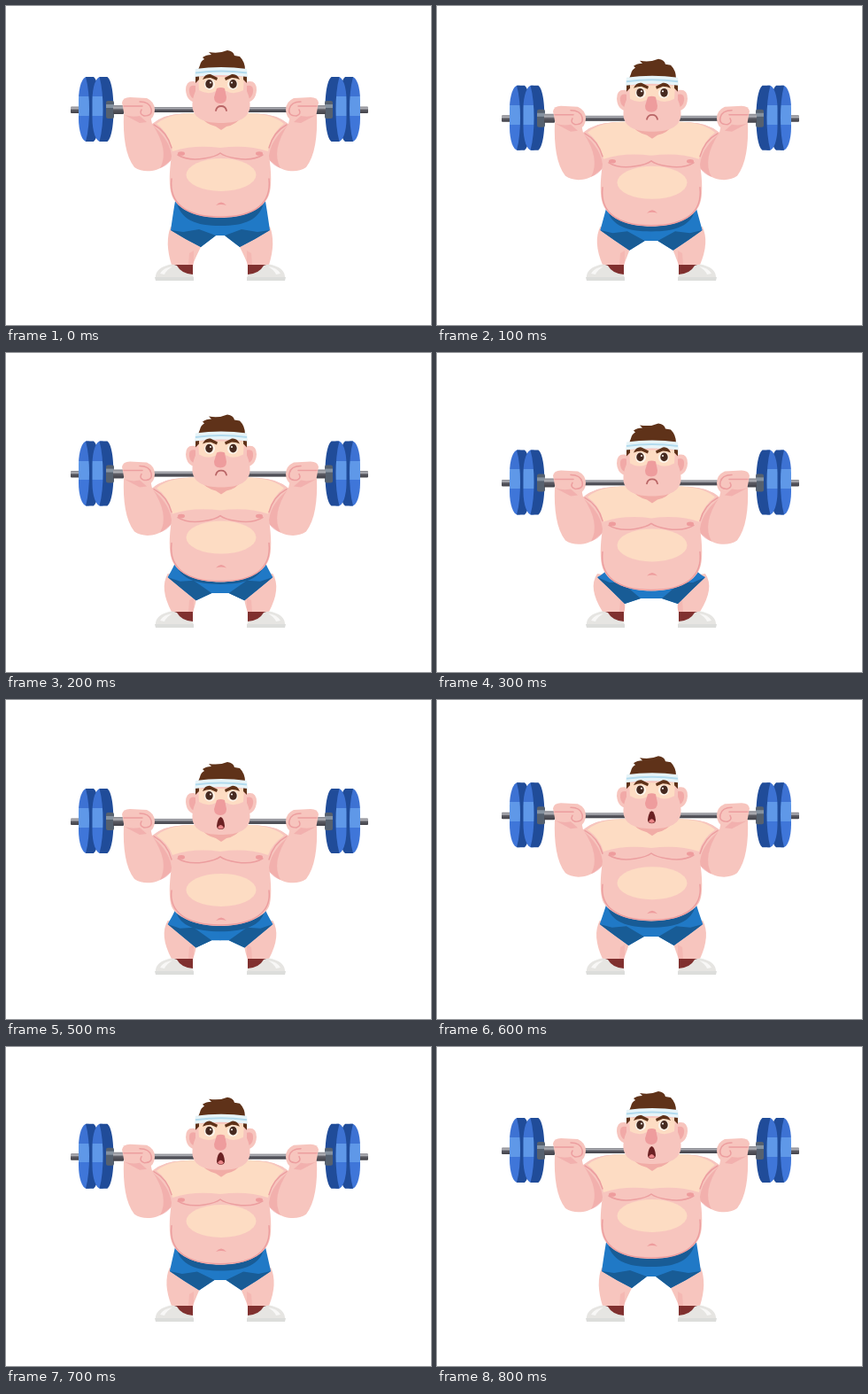
An HTML page for the animation above (1.1 s loop, 480 px wide and 360 px high).

```html
<!DOCTYPE html>
<html lang="en">
<head>
<meta charset="utf-8">
<title>Squats</title>
<style>
  html, body { margin: 0; width: 100%; height: 100%; overflow: hidden; background: #fff; }
  svg { display: block; width: 480px; height: 360px; }
  .skin { fill: #f7c5be; }
  .cream { fill: #fddcc3; }
  .pink { fill: #ee9c9d; }
  .blue { fill: #2079c6; }
  .navy { fill: #185c96; }
  .hair { fill: #5f3219; }
  .crease { fill: none; stroke: #ec9e9f; stroke-width: 1.5; stroke-linecap: round; }
</style>
</head>
<body>
<svg viewBox="0 0 480 360">
  <defs>
    <linearGradient id="steel" x2="0" y2="1">
      <stop offset="0" stop-color="#85858c"/>
      <stop offset=".3" stop-color="#b0b1b7"/>
      <stop offset=".5" stop-color="#5c5c64"/>
      <stop offset="1" stop-color="#414148"/>
    </linearGradient>
    <linearGradient id="rim" x2="0" y2="1">
      <stop offset=".3" stop-color="#3d72d3"/>
      <stop offset=".3" stop-color="#5f98e8"/>
      <stop offset=".6" stop-color="#5f98e8"/>
      <stop offset=".6" stop-color="#3f76d9"/>
    </linearGradient>
    <g id="plate">
      <rect width="20" height="73" rx="9" ry="26" fill="url(#rim)"/>
      <path fill="#204c99" d="M8 0H17C22 4 24 20 24 36.500S22 69 17 73H8C11 62 12 49 12 36.500S11 11 8 0Z"/>
    </g>
  </defs>

  <!-- Left halves are reused mirrored about x = 242 -->
  <g id="leg">
    <path id="thigh" class="skin"/>
    <path class="pink" opacity=".3" d="M207 279L212 276V292H206Z"/>
    <path fill="#80302f" d="M190 292H211V304H190Z"/>
    <path fill="#e6e5e2" d="M169 308C168 300 174 295 181 293Q187 290 193 293Q198 302 211 303L212 308Z"/>
    <path fill="#fff" opacity=".7" d="M174 302Q178 295 188 294Q181 298 179 303Z"/>
    <path fill="#dcdddb" d="M168 306H212V310H169Z"/>
    <path id="shorts" class="blue"/>
    <path id="hem" class="navy"/>
  </g>
  <use href="#leg" transform="matrix(-1 0 0 1 484 0)"/>

  <g id="upper">
    <path id="shade" class="navy"/>
    <rect x="74" y="114" width="334" height="6" fill="url(#steel)"/>
    <g id="weight">
      <rect x="73" y="113.500" width="11" height="7.500" rx="1" fill="url(#steel)"/>
      <use href="#plate" x="82" y="80"/>
      <use href="#plate" x="97.500" y="80"/>
      <rect x="113" y="107" width="9" height="20" rx="2" fill="#56616f"/>
      <rect x="113" y="111" width="9" height="4" fill="#8592a0"/>
      <rect x="121" y="112" width="12" height="10" rx="1" fill="url(#steel)"/>
    </g>
    <use href="#weight" transform="matrix(-1 0 0 1 482 0)"/>

    <g id="arm">
      <path class="skin" d="M133 122C132 147 135 169 145 182C155 189 170 187 179 180L194 168L206 122Q181 120 165 133L163 124Z"/>
      <path class="pink" opacity=".5" d="M165 133Q181 143 187 160V173Q183 180 174 183Q185 163 165 133Z"/>
      <path class="skin" d="M131 109Q132 103 140 103L159 104Q168 108 168 117T160 130L151 132L134 125Z"/>
      <path class="pink" opacity=".5" d="M134 123Q143 126 151 124L159 131L151 132Z"/>
      <path class="crease" d="M133 113H154M151 108Q162 108 164 116T156 124Q150 122 153 117"/>
    </g>
    <use href="#arm" transform="matrix(-1 0 0 1 484 0)"/>

    <path id="torso" class="skin"/>
    <path id="fold" class="crease"/>
    <path id="chest" class="cream"/>
    <path class="crease" d="M167 134Q182 142 187 160M317 134Q302 142 297 160"/>
    <g id="pecs">
      <path class="crease" d="M194 168Q205 175 224 172Q237 170 242 166Q247 170 260 172Q279 175 290 168"/>
      <ellipse class="pink" cx="198" cy="166.500" rx="4" ry="2.300"/>
      <ellipse class="pink" cx="286" cy="166.500" rx="4" ry="2.300"/>
    </g>
    <g id="belly">
      <ellipse class="cream" cx="243" cy="190.500" rx="39.500" ry="18.500"/>
      <path class="pink" d="M237 225Q243 218 249 225Q243 223 237 225Z"/>
    </g>
    <path class="pink" opacity=".75" d="M219 124H267Q260 134 249 136L243 140L237 136Q225 133 219 124Z"/>

    <g id="ear">
      <path class="skin" d="M216 86Q203 82 203 95Q204 108 215 109Z"/>
      <path class="pink" opacity=".7" d="M214 90Q206 88 207 97Q208 104 214 105Z"/>
    </g>
    <use href="#ear" transform="matrix(-1 0 0 1 486 0)"/>
    <path class="skin" d="M215 72H271L272 96Q276 105 275.500 114C274 128 260 132 243 132S212 128 210.500 114Q210 105 214 96Z"/>
    <path class="cream" d="M217 80H269L268 95Q257 101 249 96H237Q228 101 218 95Z"/>
    <path class="hair" d="M217 72L219 67Q220 62 224 60L222 58Q226 55 232 55L229 52Q241 54 250 50Q257 51 258 56L264 57Q270 63 270 72Z"/>
    <path class="hair" d="M214 79H218V83L214 87ZM272 79H268V83L272 87Z"/>
    <path fill="#e7f4f8" d="M214 71Q243 67 272 71L273 80Q243 76 213 80Z"/>
    <path fill="none" stroke="#b3dbee" stroke-width="2" d="M214 75.500Q243 71.500 272 75.500"/>
    <g id="eye">
      <circle cx="230" cy="88.500" r="6" fill="#fdf4ea"/>
      <ellipse cx="229.500" cy="88" rx="4.200" ry="4.900" fill="#45291f"/>
      <circle cx="231" cy="86.500" r="1" fill="#fff"/>
      <path class="hair" d="M222 83Q225 76 231 77L239 81L238 84L231 81Q226 81 222 83Z"/>
    </g>
    <use href="#eye" transform="matrix(-1 0 0 1 486 0)"/>
    <path class="pink" d="M238 93Q242.500 91 247 93L249 103Q249 110 242 110T235 103Z"/>
    <path id="frown" fill="none" stroke="#b96566" stroke-width="1.800" stroke-linecap="round" d="M237 118Q238 113 243 113T249 118"/>
    <g id="gasp">
      <path fill="#6b2123" d="M242.500 112Q246 113 247 122Q247 126 242.500 126T238 122Q239 113 242.500 112Z"/>
      <path fill="#e98487" d="M239 124Q242.500 118 246 124Q242.500 127 239 124Z"/>
    </g>
  </g>
</svg>
<script>
const LOOP = 1100, STEP = 100, DEPTH = 29.5;
const $ = id => document.getElementById(id);
const setPath = (id, d) => $(id).setAttribute('d', d);
const shiftY = (id, y) => $(id).setAttribute('transform', `translate(0 ${y})`);

function draw(now) {
  const step = Math.floor(now % LOOP / STEP);
  // Quick descent, slower rise, then a rest at the top
  const drop = Math.max(0, Math.min(9.8 * step, 6.65 * (8 - step)));
  const k = drop / DEPTH;
  // Flesh lags behind the bar while the body pushes up
  const wobble = step > 3 && step < 7 ? Math.sin(Math.PI * (step - 3) / 4) : 0;
  const pecShift = -3 * k - 7 * wobble;
  const base = 239 - 4 * wobble;

  shiftY('upper', drop);
  shiftY('pecs', pecShift);
  shiftY('belly', -3 * k + 6 * wobble);
  setPath('torso', `M165 134C178 122 196 121 215 121H269C288 121 306 122 319 134C309 143 299 153 297 169C300 188 300 205 297 213C291 ${base - 8} 266 ${base} 242 ${base}S193 ${base - 8} 187 213C184 205 184 188 187 169C185 153 175 143 165 134Z`);
  setPath('fold', `M187 195C184 ${base - 17} 202 ${base - 1} 242 ${base - 1}S300 ${base - 17} 297 195`);
  const chestY = 160 + pecShift;
  setPath('chest', `M170 133C182 123 198 121 215 121H269C286 121 302 123 314 133Q300 143 296 ${chestY + 4}Q272 ${chestY - 4} 242 ${chestY}Q212 ${chestY - 4} 188 ${chestY + 4}Q184 143 170 133Z`);

  const hemX = 186 - 5 * k, hemY = 253;
  const lowX = 220 - 8 * k, lowY = 272 + 11 * k;
  const crotchX = 237 - 7 * k, crotchY = 259 + 18 * k;
  const hipY = 215 + 29 * k;
  const hemLine = `Q${202 - 5 * k} ${263 + 5 * k} ${lowX} ${lowY}L${crotchX} ${crotchY}`;
  setPath('thigh', `M${hemX} ${hemY - 4}Q${179 - 9 * k} ${267 - 2 * k} 187 292H211Q213 ${286 + 3 * k} ${lowX} ${lowY}L220 255Z`);
  setPath('shorts', `M192 ${hipY}Q190 ${hipY + 10 - 6 * k} ${hemX} ${hemY}${hemLine}H242.5V${hipY}Z`);
  setPath('hem', `M${hemX} ${hemY}${hemLine}L${218 - 9 * k} ${252 + 7 * k}L${200 - 5 * k} ${255 + 4 * k}Z`);
  const low = 238 + 10 * (1 - k);
  setPath('shade', `M192 218C196 ${low - 6} 215 ${low} 242 ${low}S288 ${low - 6} 292 218Z`);

  const rising = step >= 4;
  $('frown').style.display = rising ? 'none' : '';
  $('gasp').style.display = rising ? '' : 'none';
}

const start = performance.now();
function tick() {
  draw(performance.now() - start);
  requestAnimationFrame(tick);
}
tick();
</script>
</body>
</html>
```
